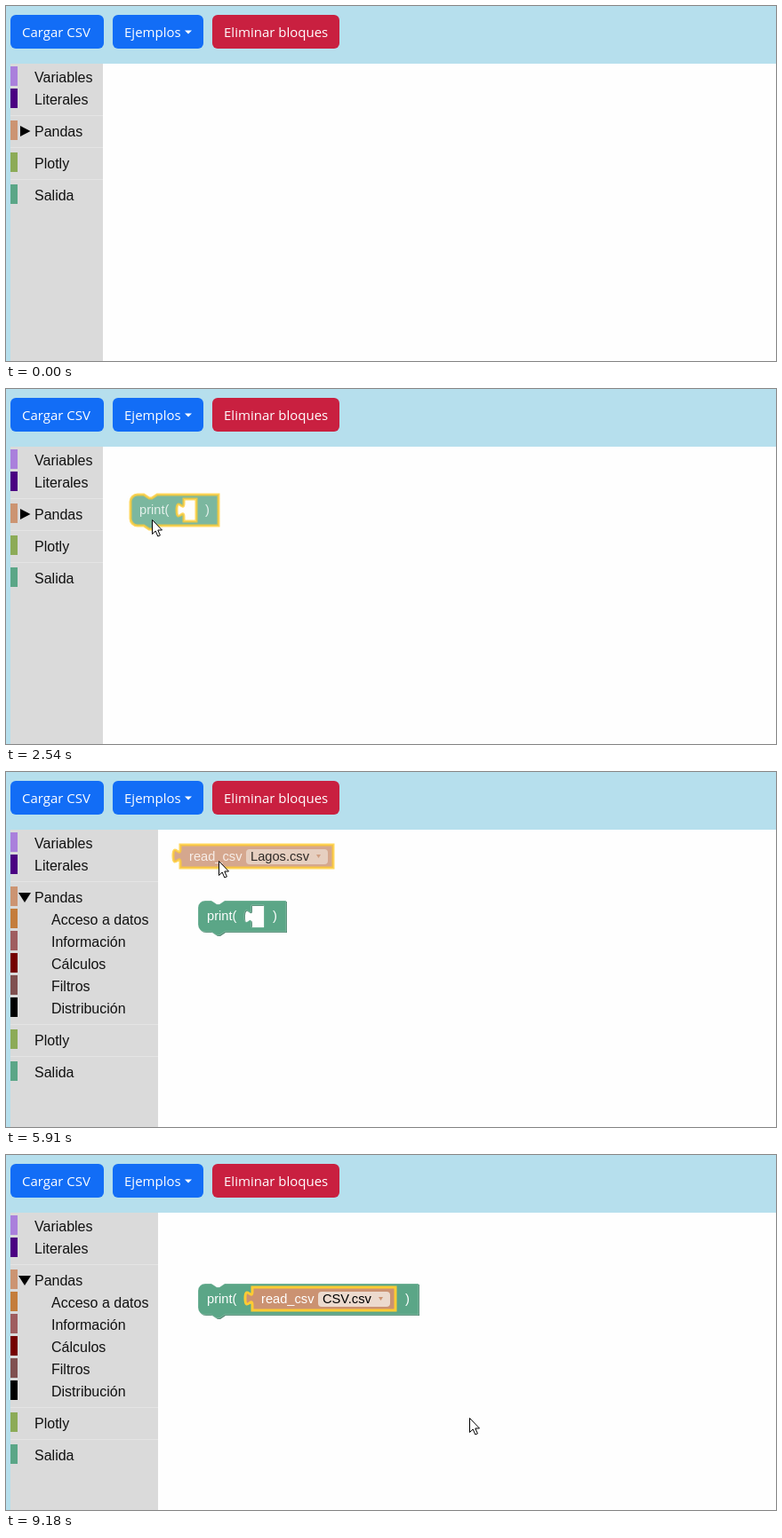
Animation, 866 px wide and 400 px high, one loop 9.22 s. Source, as an HTML page with a canvas:

```html
<!DOCTYPE html>
<html lang="es">
<head>
<meta charset="utf-8">
<style>
html, body { margin: 0; width: 866px; height: 400px; overflow: hidden; }
canvas { display: block; }
</style>
</head>
<body>
<canvas width="866" height="400"></canvas>
<script>
const ctx = document.querySelector('canvas').getContext('2d');
const LOOP = 9220;
const SANS = '"Liberation Sans", Arial, sans-serif';
const UI = '"Open Sans", "Noto Sans", sans-serif';
const GREEN = '#5ba687', ORANGE = '#cb9272', GOLD = '#fc3', PAPER = '#fefefe';
const BLUE = '#126df6', RED = '#c92040', GRAY = '#dadada';

// Moments of the story, in ms
const T = {
  openOut: 1030, grabPrint: 2150, closeOut: 2200, dropPrint: 3050,
  expand: 3830, openData: 4420, grabRead: 5700, closeData: 5760,
  preview: 6470, dropRead: 6640, openMenu: 7545, choose: 8430
};

// Pointer stops: time, x, y
const STOPS = [
  [30, 372, 362], [900, 91, 208], [1400, 91, 208], [1950, 149, 100],
  [2150, 149, 100], [2540, 164, 147], [2950, 240, 173], [3100, 240, 173],
  [3700, 52, 142], [3950, 52, 142], [4300, 99, 170], [4950, 99, 170],
  [5550, 230, 90], [5700, 230, 90], [6410, 290, 155], [6600, 314, 166],
  [6750, 314, 166], [7350, 378, 165], [7750, 378, 165], [8300, 396, 230],
  [8450, 396, 230], [9000, 521, 296]
];

const MAIN = [['Variables', '#aa80dc'], ['Literales', '#4b0082'], ['Pandas', '#cc9472'],
  ['Plotly', '#8cab57'], ['Salida', GREEN]];
const SUB = [['Acceso a datos', '#c47d3c'], ['Información', '#9f5d5f'], ['Cálculos', '#750000'],
  ['Filtros', '#805050'], ['Distribución', '#000']];

const clamp = v => Math.max(0, Math.min(1, v));

// Speed through a stop: the mean over its neighbours, or rest where the motion turns or holds
function speed(i, axis) {
  const a = STOPS[i - 1], b = STOPS[i], c = STOPS[i + 1];
  if (!a || !c || (b[axis] - a[axis]) * (c[axis] - b[axis]) <= 0) return 0;
  return (c[axis] - a[axis]) / (c[0] - a[0]);
}

function pointer(t) {
  const i = STOPS.findIndex(s => s[0] > t);
  if (i < 0) return STOPS[STOPS.length - 1].slice(1);
  const a = STOPS[i - 1], b = STOPS[i], d = b[0] - a[0];
  const u = (t - a[0]) / d, v = 1 - u;
  return [1, 2].map(k =>
    v * v * (1 + 2 * u) * a[k] + u * u * (3 - 2 * u) * b[k] +
    d * u * v * (v * speed(i - 1, k) - u * speed(i, k)));
}

function rect(x, y, w, h, color, r = 0) {
  ctx.fillStyle = color;
  ctx.beginPath();
  ctx.roundRect(x, y, w, h, r);
  ctx.fill();
}

function text(str, x, y, color, size = 16, font = SANS) {
  ctx.fillStyle = color;
  ctx.font = `${size}px ${font}`;
  ctx.fillText(str, x, y);
}

function shape(d, color) {
  ctx.fillStyle = color;
  ctx.fill(new Path2D(d), 'evenodd');
}

function block(x, y, d, color, selected, alpha, content) {
  ctx.save();
  ctx.translate(x, y);
  ctx.globalAlpha *= alpha;
  const path = new Path2D(d);
  if (!selected) {
    ctx.translate(1, 1);
    shape(d, color === GREEN ? '#49846c' : '#a2755b');
    ctx.translate(-1, -1);
  }
  shape(d, color);
  ctx.lineWidth = selected ? 3 : 1;
  ctx.strokeStyle = selected ? GOLD : 'rgba(255,255,255,.25)';
  ctx.stroke(path);
  content();
  ctx.restore();
}

const statement = w => `M0 8A8 8 0 0 1 8 0H15l6 4h3l6 -4H${w}V35H30l-6 4h-3l-6 -4H8a8 8 0 0 1 -8 -8z`;
const hole = x => `M${x} 5v5c0 10 -8 -8 -8 7.5s8 -2.5 8 7.5V30h14V5z`;
const value = w => `M0 0H${w}V26H0V20c0 -10 -8 8 -8 -7.5s8 2.5 8 -7.5z`;

function printBlock(x, y, inner, selected, alpha = 1) {
  const w = inner ? inner + 87 : 99;
  block(x, y, statement(w) + (inner ? '' : hole(60)), GREEN, selected, alpha, () => {
    text('print(', 10, 22, '#fff', 14.667);
    text(')', w - 15, 22, '#fff', 14.667);
  });
}

function showBlock(x, y) {
  block(x, y, statement(99) + hole(16), GREEN, false, 1,
    () => text('.show()', 40, 22, '#fff', 14.667));
}

const readWidth = file => file === 'CSV.csv' ? 161 : 172;

function readBlock(x, y, file, selected, alpha = 1, open = false) {
  const w = readWidth(file);
  block(x, y, value(w), ORANGE, selected, alpha, () => {
    text('read_csv', 10, 18, '#fff', 14.667);
    rect(74, 5, w - 80, 17, '#ecdace', 4);
    if (open) {
      ctx.lineWidth = 1.5;
      ctx.strokeStyle = '#fff';
      ctx.stroke();
    }
    text(file, 79, 18, '#000', 14.667);
    shape(`M${w - 19} 11h5l-2.5 4z`, ORANGE);
  });
}

function header() {
  rect(0, 0, 866, 400, '#b6dfed');
  rect(5, 10, 105, 38, BLUE, 6);
  rect(120, 10, 102, 38, BLUE, 6);
  rect(232, 10, 143, 38, RED, 6);
  text('Cargar CSV', 18, 35, '#fff', 15, UI);
  text('Ejemplos', 133, 35, '#fff', 15, UI);
  text('Eliminar bloques', 245, 35, '#fff', 15, UI);
  shape('M201 27.5h8l-4 4z', '#fff');
}

function row([name, color], y, x, width, selected) {
  rect(5, y, selected ? width : 8, 22, color);
  text(name, x, y + 18, selected ? '#fff' : '#111');
}

function toolbox(expanded, selected) {
  const width = expanded ? 166 : 104;
  rect(5, 65, width, 335, GRAY);
  let y = 68;
  MAIN.forEach((item, i) => {
    if (i > 1) {
      rect(5, y + 5, width, 1, '#e4e4e4');
      y += 11;
    }
    row(item, y, 32, width, selected === item[0]);
    y += 25;
    if (i !== 2) return;
    shape(expanded ? 'M14 136h14l-7 11z' : 'M16 135l11.5 6l-11.5 6z', '#000');
    if (expanded) for (const sub of SUB) {
      row(sub, y, 51, width, selected === sub[0]);
      y += 25;
    }
  });
}

function flyout(x, right) {
  ctx.globalAlpha = .8;
  rect(x, 65, right - x, 335, '#d8d8d8', [0, 8, 0, 0]);
  ctx.globalAlpha = 1;
}

// Slides down while it fades in, and back while it fades out
function menu(alpha, hoverSecond) {
  ctx.save();
  ctx.translate(0, 16 * (alpha - .5));
  ctx.globalAlpha = alpha;
  ctx.shadowColor = 'rgba(0,0,0,.3)';
  ctx.shadowBlur = 4;
  rect(341, 180, 113, 64, '#fff', 2);
  ctx.shadowBlur = 0;
  ctx.lineWidth = 1;
  ctx.strokeStyle = '#dadce0';
  ctx.stroke();
  shape('M388 180l10 -9l10 9z', '#fff');
  rect(345, hoverSecond ? 212 : 185, 104, 26, '#dcdcdc');
  text('✓', 351, 203, '#000', 14, '"DejaVu Sans", sans-serif');
  text('Lagos.csv', 374, 203, '#000', 13);
  text('CSV.csv', 374, 229, '#000', 13);
  ctx.restore();
}

function arrow(x, y) {
  ctx.save();
  ctx.translate(x + .5, y + .5);
  const d = 'M0 0V16l3.7 -3.5l2.6 6l2.6 -1.1l-2.6 -5.9H11z';
  shape(d, '#fff');
  ctx.lineWidth = 1;
  ctx.strokeStyle = '#000';
  ctx.stroke(new Path2D(d));
  ctx.restore();
}

function draw(t) {
  const during = (a, b) => t >= a && t < b;
  const [px, py] = pointer(Math.max(t, 30)).map(Math.round);
  const expanded = t >= T.expand;
  const outOpen = during(T.openOut, T.closeOut);
  const dataOpen = during(T.openData, T.closeData);
  const dragPrint = during(T.grabPrint, T.dropPrint);
  const file = t < T.choose ? 'Lagos.csv' : 'CSV.csv';
  const inner = t >= T.preview ? readWidth(file) : 0;

  header();
  rect(109, 65, 757, 335, PAPER);
  if (t >= T.dropPrint) printBlock(216, 145, inner, t < T.grabRead);
  if (during(T.preview, T.dropRead)) {
    ctx.save();
    ctx.translate(277, 149);
    shape(value(172), 'rgba(0,0,0,.2)');
    ctx.restore();
  }

  toolbox(expanded, outOpen ? 'Salida' : dataOpen ? 'Acceso a datos' : '');
  if (outOpen) {
    flyout(109, 243);
    printBlock(125, 72, 0, false);
    showBlock(125, 136);
  }
  if (dataOpen) {
    flyout(171, 379);
    readBlock(187, 72, file, false);
  }

  if (dragPrint) printBlock(px - 24, py - 28, 0, true, .8);
  if (during(T.grabRead, T.dropRead)) readBlock(px - 43, py - 18, file, true, .8);
  if (t >= T.dropRead) readBlock(277, 149, file, true, 1, during(T.openMenu, T.choose));
  const menuAlpha = clamp((t - T.openMenu) / 250) * clamp(1 - (t - T.choose) / 250);
  if (menuAlpha > 0) menu(menuAlpha, py > 214);

  if (t >= 30) arrow(px, py);
}

function tick() {
  draw(performance.now() % LOOP);
  requestAnimationFrame(tick);
}
tick();
</script>
</body>
</html>
```
